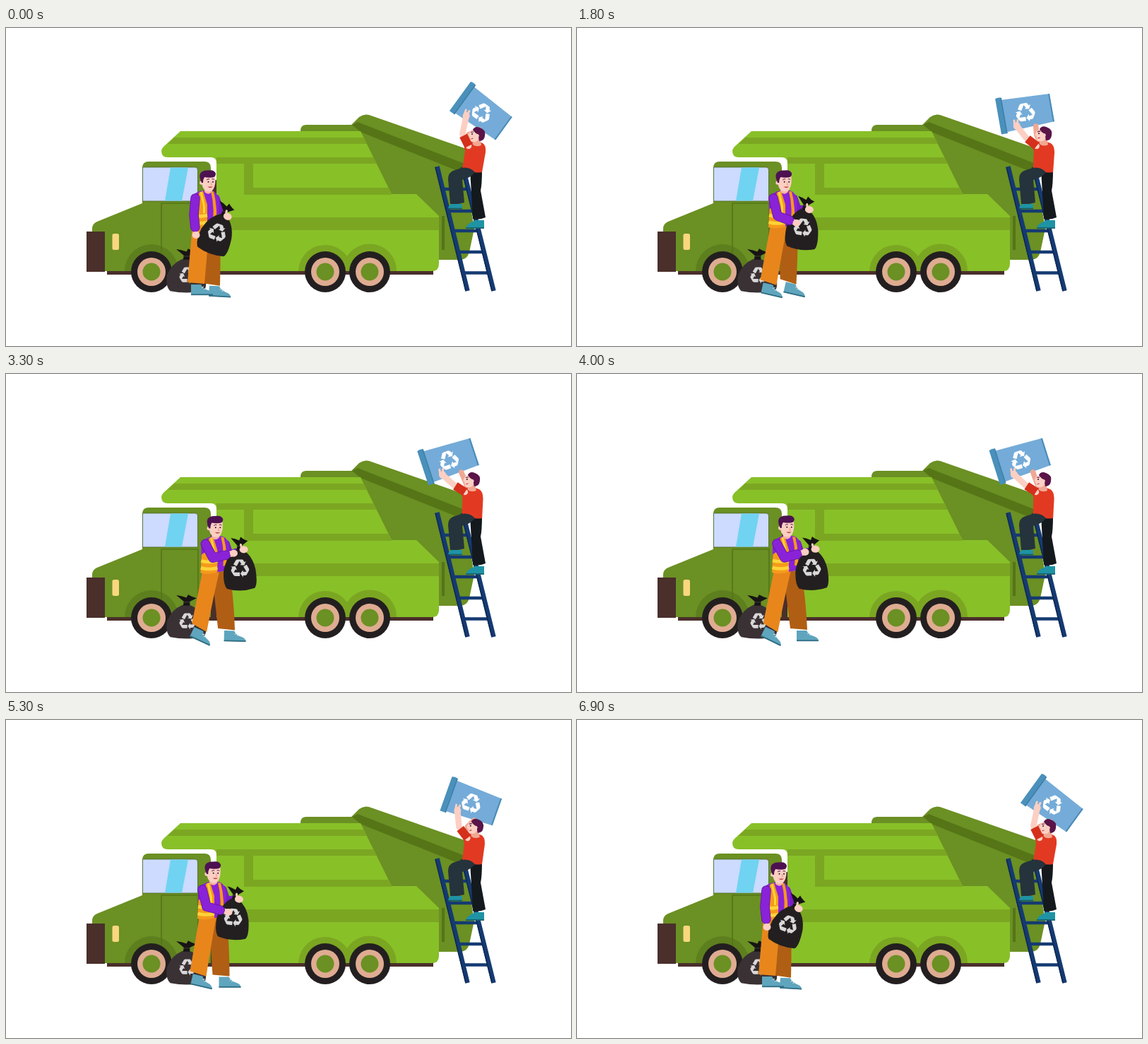
Write an HTML page that moves like this. It is 800 px wide and 450 px high and loops after 7 s.

```html
<!DOCTYPE html>
<html lang="en">
<head>
<meta charset="utf-8">
<title>Recycling truck</title>
<style>
html, body { margin: 0; width: 100%; height: 100%; overflow: hidden; background: #fff; }
svg { display: block; width: 100vw; height: 100vh; }
.limb { fill: none; stroke-linecap: round; stroke-linejoin: round; }
.skin { fill: #fccfc3; }
.tone { fill: #6b9023; }
.shade { fill: #557517; }
.lime { fill: #88c028; }
.mid { fill: #7ba622; }
.brown { fill: #4a2f2b; }
</style>
</head>
<body>
<svg viewBox="0 0 800 450" xmlns="http://www.w3.org/2000/svg">
<defs>
  <path id="arrow" d="M-9.4-6 L-6-11.7 Q-5-13-3.3-13 H3 Q4.5-13 5.3-11.5 L6.7-9 L9-10.3 L6.4-4.2 L0-5 L2.2-6.5 L-.4-10.6 L-4.8-3.2Z"/>
  <g id="cycle">
    <use href="#arrow"/><use href="#arrow" transform="rotate(120)"/><use href="#arrow" transform="rotate(240)"/>
  </g>
  <g id="sack">
    <path d="M-5-28 H4 Q18-20 22 0 Q25 22 20 27 Q0 33-19 27 Q-25 20-23 0 Q-18-20-5-28Z"/>
    <path d="M-4-27 L-3-34 L-12-45 Q-6-44 0-41 L2-46 Q6-42 12-40 L4-34 L4-27Z" fill="#171415"/>
    <path d="M-4-33 H4" stroke="#4b4446" stroke-width="1"/>
  </g>
  <g id="wheel">
    <circle r="29" fill="#231f20"/><circle r="20" fill="#dfac92"/><circle r="12.5" class="tone"/>
  </g>
  <g id="shoe">
    <path d="M-7 2 H7 Q10 8 17 10 Q24 12 24 17 H-7Z" fill="#5fa5bd"/>
    <path d="M-7 16.3 H24" stroke="#2f6d83" stroke-width="1.8"/>
    <path d="M8 7 l3-2 M11 9 l3-2" stroke="#d6edf3" stroke-width="1"/>
  </g>
</defs>

<g id="truck">
  <path class="tone" d="M488 138 L500 126 Q507 121 514 123 L652 171 L650 202 L663 284 L656 317 Q653 328 643 328 H600 L540 240Z"/>
  <path class="shade" d="M488 138 L498 133 L649 192 V206 L502 147Z M617 266 H621 V314 H617Z"/>
  <path class="tone" d="M417 147 V144 Q418 137 425 137 H490 L502 147Z"/>
  <path class="brown" d="M143 340 H605 V349 H143Z M288 215 H300 V344 H288Z"/>
  <path class="lime" d="M247 146 H502 L546 235 H581 L613 266 V334 Q613 344 603 344 H298 V191 Q298 183 290 183 H229 Q220 183 220 174 Q220 171 223 168Z"/>
  <path class="mid" d="M238 155 H506.500 L511 164 H229Z M298 183 H520 L525 192 H350 V226 H541.500 L546 236 H337 V192 H298Z M298 268 H613 V286 H298Z M414 344 A38 38 0 0 1 483 323 A38 38 0 0 1 553 344Z"/>
  <path class="tone" d="M122 290 V284 Q122 277 129 274 L193 248 V198 Q193 189 202 189 H281 Q290 189 290 198 V344 H140 V290Z"/>
  <path d="M168 344 A38 38 0 0 1 244 344Z" fill="#5d7f1e"/>
  <path d="M220 344 V248 H272 V344" fill="none" stroke="#557517" stroke-width="1.6"/>
  <path d="M193.500 197 H268 Q271.500 197 271.500 201 V245 H193.500Z" fill="#ccdbff" stroke="#4b6424" stroke-width=".8"/>
  <path d="M233 197.500 H258 L249 244.500 H225Z" fill="#70d3f1"/>
  <path class="brown" d="M114 288 H140 V345 H114Z"/>
  <rect x="150.500" y="291" width="9.500" height="23" rx="2.500" fill="#f9d77e"/>
  <use href="#wheel" x="206" y="345"/><use href="#wheel" x="452" y="345"/><use href="#wheel" x="515" y="345"/>
</g>

<g id="ladder" fill="none" stroke="#153a72">
  <path d="M617 228 H655 M625 259 H662 M633 287 H669 M640 317 H676 M647 346.500 H683" stroke-width="4.500"/>
  <path d="M610.500 196 L653.500 372 M647 197 L690.500 372" stroke-width="6.500"/>
  <path d="M608 197 L651 372 M644.500 197 L688 372" stroke="#0e2951" stroke-width="1.500"/>
</g>

<g id="climber">
  <path d="M657 200 H674 Q674 222 672 230 L679 268 Q670 272 661 270 L659 235Z" fill="#14191d"/>
  <path d="M663 272 H677 V283.500 H651 Q652 277 663 273Z" fill="#1f93a4"/>
  <path d="M651 283 H677" stroke="#125966" stroke-width="1.500"/>
  <g id="bin">
    <path d="M-33-23 L37-20 V20 L-33 23Z" fill="#74abd8"/>
    <path d="M35-20 H37 V20 H35Z" fill="#4b8cb8"/>
    <path d="M-40-26 Q-35-28-31-26 V25 H-40Z" fill="#4a90bb"/>
    <path d="M-32-26 V25" stroke="#3b7aa2" stroke-width="1"/>
    <use href="#cycle" fill="#fff" transform="translate(-1.500 .5) scale(1.03)"/>
  </g>
  <path id="farArm" class="limb" stroke="#f0a893" stroke-width="7.500"/>
  <path id="shirt" fill="#e23a22"/>
  <g id="climberHead">
    <path d="M660 156 L671 154 L673 166 Q666 169 661 165Z" fill="#f0a893"/>
    <path class="skin" d="M657 146 L654.500 152 L656.500 154 L657 159 Q661 163 667 160 L673 152 L668 143Z"/>
    <path d="M661 144 Q664 138 671 141 Q680 144 678 153 Q677 160 670 160 Q669 156 669 151 Q664 149 661 144Z" fill="#5a1448"/>
    <circle class="skin" cx="667.500" cy="152.500" r="2.300"/>
    <path d="M658 147.500 l4-.5" stroke="#5a1448" stroke-width="1.200"/>
    <circle cx="660" cy="150" r="1" fill="#2a1120"/>
    <path d="M658.500 157 l3-1" stroke="#c2433c" stroke-width="1.200"/>
  </g>
  <path id="nearArm" class="limb" stroke="#fccfc3" stroke-width="8.500"/>
  <path id="sleeve" class="limb" stroke="#d4301c" stroke-width="12" style="stroke-linecap:butt"/>
  <g id="grip" class="skin">
    <ellipse rx="5" ry="5.500"/>
    <path d="M-3-2 L-3-8 M1-3 L2-8" stroke="#fccfc3" stroke-width="3" stroke-linecap="round"/>
  </g>
  <path d="M645 198 Q656 196 664 204 Q658 212 646 215 L649 247 Q639 250 629 249 L626 214 Q626 205 633 202Z" fill="#25333c"/>
  <path d="M631 249 H646 V256 H626 Q626 251 631 249Z" fill="#1f93a4"/>
  <path d="M626 255.500 H646" stroke="#125966" stroke-width="1.500"/>
</g>

<g id="floorSack">
  <use href="#sack" fill="#3a3134" transform="translate(255.500 350) scale(1.2 .82)"/>
  <use href="#cycle" fill="#d9d7d7" transform="translate(257 350) scale(.88)"/>
</g>

<g id="worker">
  <use id="backShoe" href="#shoe"/>
  <path id="backLeg" fill="#b05e14"/>
  <use id="frontShoe" href="#shoe"/>
  <path id="frontLeg" fill="#e8861c"/>
  <path id="backArm" class="limb" stroke="#7a1cc4" stroke-width="11"/>
  <g id="torso">
    <path d="M262 241 Q267 231 280 230 H292 Q300 233 302 245 L300 278 L285 281 H262Z" fill="#8a22d8"/>
    <path d="M273 233 L279 230.500 L285 250 V281 Q272 285 261 282 L262.500 256 L272 250Z" fill="#f59a1b"/>
    <path d="M290 231 L294 231.500 Q299 250 298 272 H293 Q295 250 290 231Z" fill="#f59a1b"/>
    <path d="M276 232 L280.500 252 V262" fill="none" stroke="#ffd338" stroke-width="3"/>
    <path d="M262 265 Q273 268 285 265 M261.500 275 Q273 278 285 275" fill="none" stroke="#ffd338" stroke-width="4.500"/>
  </g>
  <g id="head">
    <path d="M281 225 H292 L292 231 Q287 238 281 232Z" fill="#f3b3a3"/>
    <path class="skin" d="M277 209 Q276 224 281 229 Q287 234 293 229 Q298 221 296 209Z"/>
    <circle class="skin" cx="277" cy="219" r="2.800"/>
    <path d="M277 219 Q273 211 275 206 Q278 201 286 201.500 Q295 200 297 206 Q297 211 292 211.500 Q285 212 281 211 Q279 214 279 219Z" fill="#4d1152"/>
    <path d="M284 215 q2-2 4-1 M291.500 214 q2-1 3.500.5" fill="none" stroke="#4d1152" stroke-width="1"/>
    <circle cx="286.500" cy="217.800" r="1" fill="#2a1120"/><circle cx="293" cy="217.800" r="1" fill="#2a1120"/>
    <path d="M290 218 l1.500 4 h-2" fill="none" stroke="#e69a8a" stroke-width="1"/>
    <path d="M285.500 224.500 Q289 228 293 224.500Z" fill="#c2433c"/>
  </g>
  <g id="held">
    <use href="#sack" fill="#231f20"/>
    <use href="#cycle" fill="#d9d7d7" transform="translate(0 -1.500) scale(.97)"/>
  </g>
  <g id="backHand" class="skin">
    <ellipse rx="6" ry="5"/>
    <path d="M-3-2 L-4-7" stroke="#fccfc3" stroke-width="3" stroke-linecap="round"/>
  </g>
  <path id="wrist" class="limb" stroke="#fccfc3" stroke-width="8"/>
  <path id="armEdge" class="limb" stroke="#5d129b" stroke-width="13.500"/>
  <path id="arm" class="limb" stroke="#8a22d8" stroke-width="12"/>
  <ellipse id="hand" class="skin" rx="5.500" ry="5"/>
</g>
</svg>

<script>
const LOOP = 7000, STEP = 100;
const TIMES = [0, 800, 1800, 2600, 4000, 5300, 6900];

// One row per key time; the loop closes on the first row.
const track = rows => [...rows, rows[0]];
const tracks = {
  bin: track([[675, 120.5, 36], [663, 117.5, 21], [636, 119, -10], [628, 121.5, -18.4], [629.5, 121, -17.5], [660.5, 118, 19.5]]),
  body: track([[0, 0], [4, 3], [10, 0], [13, 0], [15, -1], [10, -1]]),
  sack: track([[298.5, 291, 20], [304.5, 292, 17], [319.5, 284, 7], [328.5, 278, 0], [332.5, 276, -2], [321.5, 281, 5]]),
  arm: track([[266, 264, 269, 293], [270, 268, 282, 293], [284, 266, 311, 276], [291, 261, 321, 258], [294, 260, 323, 252], [284, 264, 315, 272]]),
  front: track([[269, 361, 0], [270, 361, 5], [271, 360, 13], [273, 359, 22], [274, 359, 26], [272, 359, 13]]),
  back: track([[291, 363, 3], [293, 362, 9], [299, 359, 13], [308, 361.5, 5], [314, 361, 0], [304.5, 361.5, 0]])
};

const $ = id => document.getElementById(id);
const set = (id, name, value) => $(id).setAttribute(name, value);
const place = (id, x, y, a = 0) => set(id, 'transform', `translate(${x} ${y}) rotate(${a})`);
const line = (id, ...pts) => set(id, 'd', 'M' + pts.map(p => p.join(' ')).join(' L'));
const mix = (a, b, k) => [a[0] + (b[0] - a[0]) * k, a[1] + (b[1] - a[1]) * k];

// Local point (px, py) carried by a frame [x, y, degrees].
function carry([x, y, deg], px, py) {
  const a = deg * Math.PI / 180, c = Math.cos(a), s = Math.sin(a);
  return [x + px * c - py * s, y + px * s + py * c];
}

// Monotone cubic through the key rows: eases into holds, never overshoots.
function sample(rows, t) {
  t = Math.min(t, TIMES[6]);
  let i = 0;
  while (i < 5 && t >= TIMES[i + 1]) i++;
  const h = TIMES[i + 1] - TIMES[i], u = (t - TIMES[i]) / h;
  return rows[0].map((_, c) => {
    const grade = k => (rows[k + 1][c] - rows[k][c]) / (TIMES[k + 1] - TIMES[k]);
    const slope = k => {
      if (k === 0 || k === 6) return 0;
      const p = grade(k - 1), q = grade(k);
      return p * q > 0 ? 2 * p * q / (p + q) : 0;
    };
    const a = rows[i][c], b = rows[i + 1][c];
    return a + (b - a) * u * u * (3 - 2 * u)
      + h * u * (1 - u) * (slope(i) * (1 - u) - slope(i + 1) * u);
  });
}

function drawClimber(bin) {
  const lean = (bin[0] - 675) * .11;
  const bend = (bin[2] + 18) / 54;
  const shoulder = [655 + lean, 167];
  const hand = carry(bin, -16.5, 17);
  const elbow = mix(shoulder, hand, .5);
  elbow[0] -= 7 * bend;
  elbow[1] += 2 + 2 * bend;
  place('bin', ...bin);
  line('farArm', [660 + lean, 164], [655 + lean, 151], carry(bin, 10, 22));
  const s = y => lean * (203 - y) / 40;
  const p = (x, y) => `${x + s(y)} ${y}`;
  set('shirt', 'd', `M${p(646, 200)} L${p(650, 174)} Q${p(647, 167)} ${p(653, 162)} Q${p(667, 159)} ${p(675, 163)}`
    + ` Q${p(680, 166)} ${p(679, 176)} L${p(674, 204)} Q${p(660, 206)} ${p(646, 200)}Z`);
  place('climberHead', lean * 1.4, lean * .2);
  line('nearArm', shoulder, elbow, hand);
  line('sleeve', shoulder, mix(shoulder, elbow, .85));
  place('grip', ...hand, bin[2] / 2);
}

function drawLeg(id, foot, left, right, top, bulge) {
  const a = carry(foot, 12, 1), b = carry(foot, -12, -1);
  set(id, 'd', `M${left} ${top} L${right} ${top} Q${(right + a[0]) / 2 + bulge} ${(top + a[1]) / 2 - 10} ${a.join(' ')} L${b.join(' ')}Z`);
}

function drawWorker(body, sack, arm, front, back) {
  const [tx, ty] = body;
  place('backShoe', back[0] + 4, back[1], back[2]);
  drawLeg('backLeg', back, 277 + tx, 302 + tx, 280 + ty, 2);
  place('frontShoe', ...front);
  drawLeg('frontLeg', front, 264 + tx, 288 + tx, 279 + ty, 1);
  const grip = carry(sack, 6, -28);
  const joint = [297 + tx, 241 + ty];
  line('backArm', joint, [302 + tx, 256 + ty], mix([302 + tx, 256 + ty], grip, .5));
  place('torso', tx, ty);
  place('head', tx * .72, ty);
  place('held', ...sack);
  place('backHand', ...grip, sack[2]);
  const elbow = arm.slice(0, 2), hand = arm.slice(2);
  const pts = [[268 + tx, 241 + ty], elbow, mix(elbow, hand, .62)];
  line('wrist', elbow, hand);
  line('armEdge', ...pts);
  line('arm', ...pts);
  place('hand', ...hand);
}

function draw(t) {
  const at = name => sample(tracks[name], t);
  drawClimber(at('bin'));
  drawWorker(at('body'), at('sack'), at('arm'), at('front'), at('back'));
}

const start = performance.now();
function tick(now) {
  const t = Math.max(0, now - start) % LOOP;
  draw(Math.floor(t / STEP) * STEP);
  requestAnimationFrame(tick);
}
draw(0);
requestAnimationFrame(tick);
</script>
</body>
</html>
```
